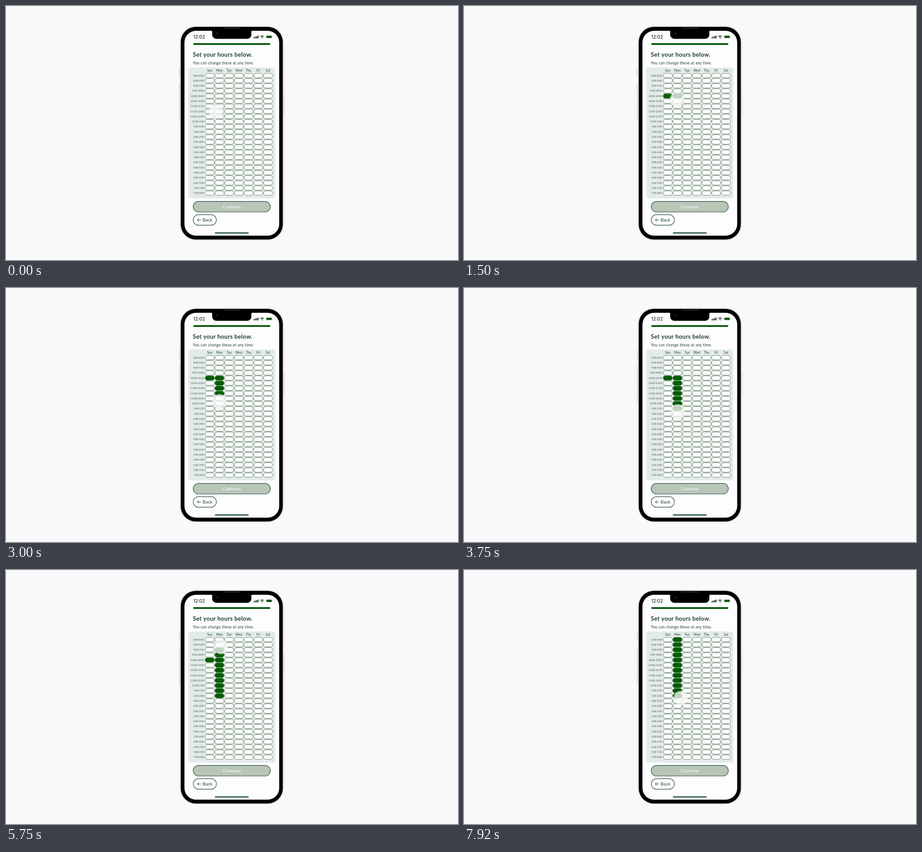
An HTML page with a canvas for the animation above (8 s loop, 997 by 561 pixels).

```html
<!DOCTYPE html>
<html lang="en">
<head>
<meta charset="utf-8">
<title>Set your hours</title>
<style>
html, body { margin: 0; width: 100%; height: 100%; overflow: hidden; background: #f9f9fb; }
canvas { display: block; width: 997px; height: 561px; }
</style>
</head>
<body>
<canvas id="stage"></canvas>
<script>
const W = 997, H = 561, LOOP = 8000, FPS = 12;
const canvas = document.getElementById('stage');
const ctx = canvas.getContext('2d');
const ratio = window.devicePixelRatio || 1;
canvas.width = Math.round(W * ratio);
canvas.height = Math.round(H * ratio);

const FACE = 'Lato, "Open Sans", sans-serif';
const INK = '#1d422b', EDGE = '#24483a', GREEN = '#075c07', PAPER = '#fdfdff';
const DAYS = ['Sun', 'Mon', 'Tue', 'Wed', 'Thu', 'Fri', 'Sat'];
const ROWS = 24;
const colX = c => 449.4 + c * 21.4;
const rowY = r => 153.7 + r * 11.285;

// Evenly timed taps down or up one column
function run(col, first, last, time, step = 0) {
  const dir = Math.sign(last - first);
  return Array.from({ length: Math.abs(last - first) + 1 }, (_, i) =>
    ({ col, row: first + i * dir, time: time + i * step }));
}

const REST = { col: 0.7, row: 6.25, time: 0 };
const TAPS = [
  ...run(0, 4, 4, 770),
  ...run(1, 4, 4, 1500),
  ...run(1, 5, 11, 2110, 303),
  ...run(1, 3, 0, 4590, 717),
  ...run(0, 4, 4, 7400),
  ...run(1, 12, 12, LOOP)
];
const STOPS = [REST, ...TAPS];

function pill(x, y, w, h, r, fill, stroke, line) {
  ctx.beginPath();
  ctx.roundRect(x, y, w, h, r);
  ctx.fillStyle = fill;
  ctx.fill();
  if (stroke) {
    ctx.strokeStyle = stroke;
    ctx.lineWidth = line;
    ctx.stroke();
  }
}

function label(str, x, y, size, color, { align = 'left', weight = 400, spacing = 0, face = FACE } = {}) {
  ctx.font = `${weight} ${size}px ${face}`;
  ctx.letterSpacing = spacing + 'px';
  ctx.textAlign = align;
  ctx.fillStyle = color;
  ctx.fillText(str, x, y);
}

function clock(half) {
  const hour = (Math.floor(half / 2) + 11) % 12 + 1;
  return hour + (half % 2 ? ':30' : ':00');
}

function drawNotch() {
  const cx = 498, top = 54, bottom = 72.4, half = 43.2;
  ctx.fillStyle = '#000';
  ctx.beginPath();
  ctx.moveTo(cx - half - 3, top);
  ctx.arcTo(cx - half, top, cx - half, bottom, 3);
  ctx.arcTo(cx - half, bottom, cx, bottom, 9);
  ctx.arcTo(cx + half, bottom, cx + half, top, 9);
  ctx.arcTo(cx + half, top, cx + half + 3, top, 3);
  ctx.lineTo(cx + half + 3, top);
  ctx.fill();
  pill(479, 47, 39, 3, 1.5, '#1d1d1d');
  pill(463, 57.2, 6.6, 6.6, 3.3, '#0c0c1e');
  pill(465, 59.2, 2.6, 2.6, 1.3, '#24245c');
}

function drawPhone() {
  const button = (x, y, h) => pill(x, y, 3, h, 1, '#e4e3de');
  button(380.8, 137, 19);
  button(380.8, 171, 41);
  button(380.8, 216, 38);
  button(611.4, 184, 57);
  pill(383.2, 43.8, 229.6, 473.8, 36, '#d9d6cf');
  pill(384.1, 44.7, 227.8, 472, 35, '#efeee9');
  pill(385.4, 46, 225.2, 469.8, 33.5, '#000');
  pill(393.6, 54.8, 209, 452.4, 25.5, PAPER);
  drawNotch();
}

function drawStatus() {
  const dark = '#1c3824';
  label('12:02', 413, 71.8, 10, '#222b26', { weight: 500, face: 'Inter, sans-serif' });
  for (let i = 0; i < 4; i++) {
    const h = 3 + i * 1.1;
    pill(546.2 + i * 2.9, 71.6 - h, 2.1, h, 0.6, dark);
  }
  ctx.strokeStyle = dark;
  ctx.lineWidth = 1.3;
  for (const r of [3.3, 5.6]) {
    ctx.beginPath();
    ctx.arc(565, 71.2, r, -Math.PI * 0.76, -Math.PI * 0.24);
    ctx.stroke();
  }
  pill(564, 69.7, 2, 2, 1, dark);
  pill(574.2, 65.6, 12, 5.2, 1.4, '#175217');
  pill(586.7, 67.2, 0.9, 2, 0.4, '#55705a');
}

function drawForm() {
  pill(413, 82, 170, 4, 2, '#0f5a12');
  label('Set your hours below.', 412, 111.8, 13, INK, { weight: 700, spacing: 0.3 });
  label('You can change these at any time.', 412, 129, 8.6, INK, { spacing: 0.22 });
  pill(402, 135.8, 192, 289.2, 5, '#e3ebe8');
  DAYS.forEach((day, c) => label(day, colX(c), 145.4, 7, INK, { align: 'center' }));

  pill(413, 431.6, 170, 23.4, 11.7, '#b8c5b7', EDGE, 1.2);
  label('Continue', 498, 446.7, 10, '#fff', { align: 'center' });
  pill(413, 460.8, 51, 23.4, 11.7, PAPER, EDGE, 1.2);
  label('Back', 433.8, 475.9, 10, INK);
  ctx.strokeStyle = INK;
  ctx.lineWidth = 1;
  ctx.beginPath();
  ctx.moveTo(430, 472.6);
  ctx.lineTo(422, 472.6);
  ctx.moveTo(425.6, 468.9);
  ctx.lineTo(422, 472.6);
  ctx.lineTo(425.6, 476.3);
  ctx.stroke();
  pill(460.8, 499.9, 74.4, 2.5, 1.25, '#1b4a38');
}

function drawGrid(t) {
  // A second tap clears a cell
  const lit = (c, r) =>
    TAPS.filter(p => p.col === c && p.row === r && p.time <= t).length % 2 === 1;
  for (let r = 0; r < ROWS; r++) {
    const y = rowY(r);
    label(clock(16 + r) + '-' + clock(17 + r), 436.5, y + 1.9, 5.3, '#3c4c42', { align: 'right' });
    DAYS.forEach((_, c) => {
      const on = lit(c, r);
      pill(colX(c) - 10, y - 4.8, 20, 9.6, 4.6, on ? GREEN : '#fdfefe', on ? GREEN : '#48694c', 0.8);
    });
  }
}

// The pointer pauses around each tap and slowly drifts up and right of the cells
function pointerAt(t) {
  const next = STOPS.findIndex(p => p.time > t - 100);
  const to = STOPS[next], from = STOPS[Math.max(0, next - 1)];
  const leave = from.time + 100, arrive = to.time - 60;
  const u = Math.min(1, Math.max(0, (t - leave) / (arrive - leave)));
  const e = u * u * (3 - 2 * u);
  const mix = (a, b) => a + (b - a) * e;
  const drift = (t / 6700) ** 2;
  return [
    colX(mix(from.col, to.col)) - 1.5 + 6.5 * drift,
    rowY(mix(from.row, to.row)) + 8.5 - 10 * drift
  ];
}

function drawPointer(t) {
  const [x, y] = pointerAt(t);
  const glow = ctx.createRadialGradient(x, y, 0, x, y, 16);
  glow.addColorStop(0, 'rgba(253,253,254,.76)');
  glow.addColorStop(0.72, 'rgba(251,252,252,.74)');
  glow.addColorStop(0.94, 'rgba(238,240,239,.76)');
  glow.addColorStop(1, 'rgba(240,242,241,.6)');
  ctx.fillStyle = glow;
  ctx.beginPath();
  ctx.arc(x, y, 16, 0, Math.PI * 2);
  ctx.fill();
}

function frame(now) {
  const step = Math.floor((now % LOOP) * FPS / 1000 + 0.06);
  const t = step * 1000 / FPS % LOOP;
  ctx.setTransform(ratio, 0, 0, ratio, 0, 0);
  ctx.fillStyle = '#f9f9fb';
  ctx.fillRect(0, 0, W, H);
  drawPhone();
  drawStatus();
  drawForm();
  drawGrid(t);
  drawPointer(t);
  requestAnimationFrame(() => frame(performance.now() - start));
}

const start = performance.now();
frame(0);
</script>
</body>
</html>
```
